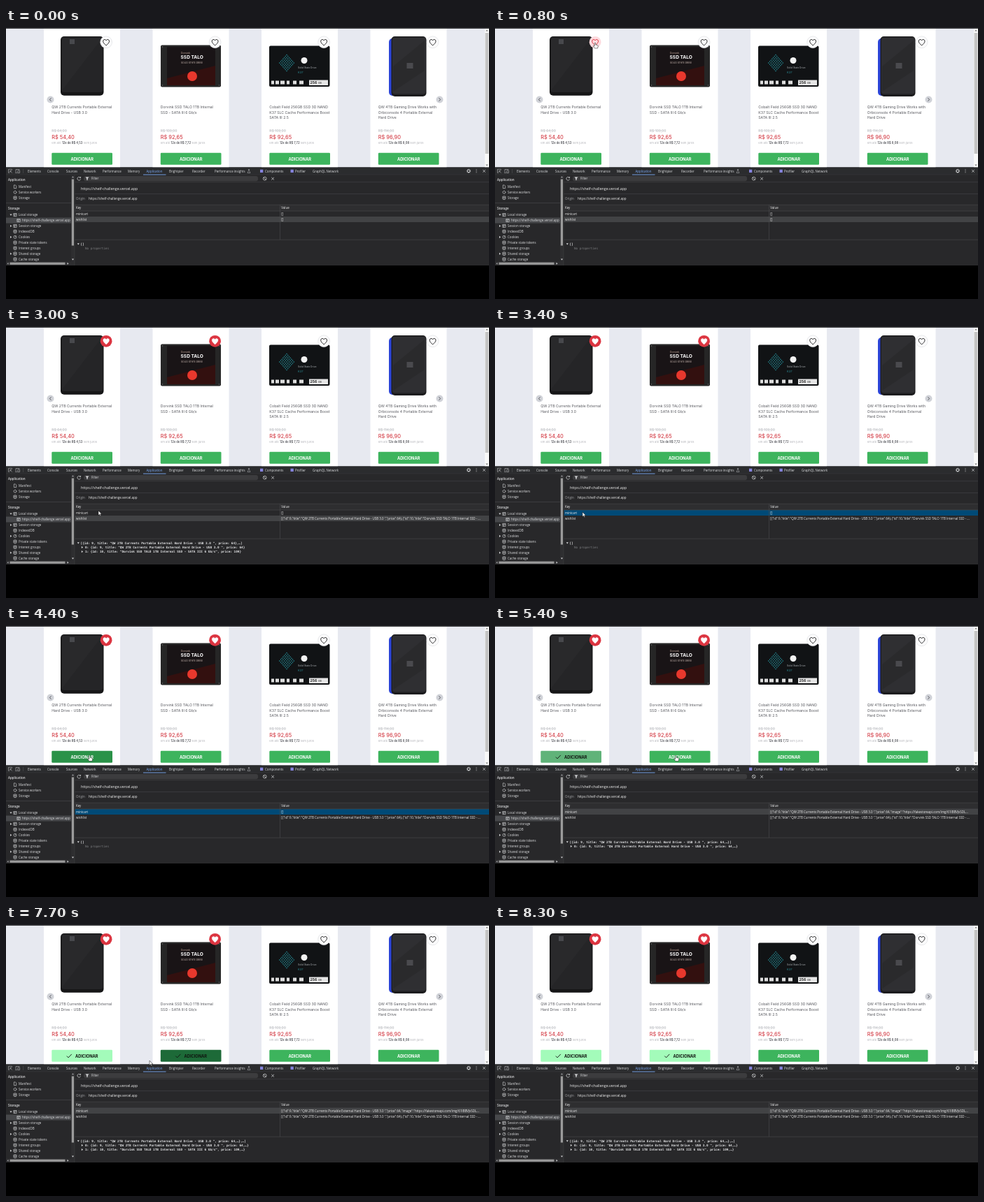
An HTML page that plays this animation: 690x388 px, repeating every 8.9 s.

```html
<!DOCTYPE html>
<html lang="en">
<head>
<meta charset="utf-8">
<title>Wishlist and cart storage</title>
<style>
html, body { margin: 0; width: 100%; height: 100%; overflow: hidden; background: #000; }
svg { display: block; width: 690px; height: 388px; }
.ui { font-family: "Open Sans", "Noto Sans", sans-serif; }
.shop { font-family: Inter, Roboto, sans-serif; }
.mono { font-family: "DejaVu Sans Mono", "Liberation Mono", monospace; }
</style>
</head>
<body>
<svg id="stage" viewBox="0 0 690 388"></svg>
<script>
const LOOP = 8900;
const STEP = 100;
const CARD_GAP = 155.5;

const rect = (x, y, w, h, fill, more = '') =>
  `<rect x="${x}" y="${y}" width="${w}" height="${h}" fill="${fill}" ${more}/>`;
const circle = (x, y, r, fill, more = '') =>
  `<circle cx="${x}" cy="${y}" r="${r}" fill="${fill}" ${more}/>`;
const line = (d, color, width = 0.7, more = '') =>
  `<path d="${d}" fill="none" stroke="${color}" stroke-width="${width}" ${more}/>`;
const shape = (d, fill, more = '') => `<path d="${d}" fill="${fill}" ${more}/>`;
const text = (x, y, str, size, fill, cls = 'ui', more = '') =>
  `<text x="${x}" y="${y}" font-size="${size}" fill="${fill}" class="${cls}" ${more}>${str}</text>`;

const DRIVE = 'QW 2TB Currents Portable External Hard Drive - USB 3.0 ';
const SSD = 'Dorvink SSD TALO 1TB Internal SSD - SATA III 6 Gb/s';

const products = [
  { title: ['QW 2TB Currents Portable External', 'Hard Drive - USB 3.0'], old: '64,00', price: '54,40', part: '4,53' },
  { title: ['Dorvink SSD TALO 1TB Internal', 'SSD - SATA III 6 Gb/s'], old: '109,00', price: '92,65', part: '7,72' },
  { title: ['Cobalt Field 256GB SSD 3D NAND', 'K37 SLC Cache Performance Boost', 'SATA III 2.5'], old: '109,00', price: '92,65', part: '7,72' },
  { title: ['QW 4TB Gaming Drive Works with', 'Orbiconsole 4 Portable External', 'Hard Drive'], old: '114,00', price: '96,90', part: '8,08' }
];

// Fine diamond of small rhombs on the third product
function lattice(cx, cy) {
  let d = '';
  for (let i = -3; i <= 3; i++) {
    for (let j = -3; j <= 3; j++) {
      d += `M${cx + (i - j) * 1.7} ${cy + (i + j) * 1.9 - 1}l1 1l-1 1l-1-1Z`;
    }
  }
  return shape(d, '#23838c');
}

// Product pictures, in stage coordinates
const pictures = [
  rect(78, 12, 61.5, 84.8, '#161617', 'rx="5"') +
    rect(79.3, 13, 59, 79, '#252527', 'rx="4"') +
    shape('M81 15H137L81 88Z', '#29292b') +
    rect(91, 16, 7, 7, '#48494d'),
  rect(221, 24.5, 86, 60, '#262626', 'rx="2"') +
    rect(230, 27, 69, 55, '#191416') +
    shape('M230 82V72L299 54V82Z', '#33100f') +
    text(250, 37, 'Dorvink', 3.6, '#c5a79a', 'shop') +
    text(249.5, 44, 'SSD TALO', 6.6, '#fff', 'shop', 'font-weight="700"') +
    text(250, 50.5, 'SOLID STATE DRIVE', 3.3, '#c9b8b0', 'shop') +
    circle(266, 69, 7, '#e8382d') +
    [[223.5, 27], [304.5, 27], [223.5, 82], [304.5, 82]].map(p => circle(...p, 0.8, '#666')).join(''),
  rect(376, 25.5, 86.5, 58.5, '#111315', 'rx="2"') +
    lattice(401, 50) +
    circle(426, 46.5, 4.5, '#f2f2f2') +
    text(417, 58, 'Solid State Drive', 3.4, '#a8acb0', 'shop') +
    text(417, 64.5, 'K37', 4, '#2b8e98', 'shop') +
    [379, 385, 392, 401, 410, 419].map((x, i) => rect(x, 75.5, 4 + i % 3, 5, '#dedede')).join('') +
    rect(433, 74.5, 27, 7.5, '#e6e6e6') +
    text(434.5, 80.2, '256', 5.2, '#151515', 'shop', 'font-weight="600"') +
    text(446, 80.2, 'GB', 3.4, '#151515', 'shop'),
  rect(547, 15, 30, 82, '#2c45d8', 'rx="5"') +
    rect(550.5, 12, 50, 86, '#1c1c1e', 'rx="5"') +
    rect(552, 13.5, 47.5, 81, '#2f2f32', 'rx="4"') +
    shape('M553 55L598 18V61L553 91Z', '#2a2a2c') +
    rect(572.5, 50, 9, 8, '#4a4a4e')
];

const HEART = 'M0 4.3C-2.2 2.5-4.4 .7-4.4-1.5A2.3 2.3 0 0 1 0-2.7A2.3 2.3 0 0 1 4.4-1.5C4.4 .7 2.2 2.5 0 4.3Z';

function card(p, i) {
  const x = 65.3 + CARD_GAP * i;
  const titles = p.title.map((s, n) => text(x, 115.4 + 7.1 * n, s, 5.15, '#55565c', 'shop')).join('');
  const part = `em até <tspan fill="#55565c" font-weight="600">12x de R$ ${p.part}</tspan> sem juros`;
  return rect(x - 11.3, 1, 109, 198.5, '#fff') + pictures[i] +
    `<circle id="dot${i}" cx="${x + 77.8}" cy="20.3" r="8.4" stroke-width=".6"/>` +
    `<path id="heart${i}" d="${HEART}" transform="translate(${x + 77.8} 20.6)" stroke-linejoin="round"/>` +
    titles +
    text(x, 148.6, `R$ ${p.old}`, 5, '#bcbdc2', 'shop', 'text-decoration="line-through"') +
    text(x, 158.6, `R$ ${p.price}`, 7.4, '#d5434c', 'shop', 'font-weight="500"') +
    text(x, 165.8, part, 4.2, '#b4b5ba', 'shop') +
    `<rect id="btn${i}" x="${x}" y="178.7" width="86.7" height="17" rx="1.2"/>` +
    `<path id="tick${i}" d="M${x + 21.5} 187.6l2.3 2.3 4.7-5" fill="none" stroke="#111" stroke-width=".9"/>` +
    `<text id="label${i}" y="189.5" font-size="5.7" font-weight="700" text-anchor="middle" class="shop">ADICIONAR</text>`;
}

function carousel() {
  const arrow = (x, dir) => circle(x, 102.5, 5, '#d0d2d8') +
    line(`M${x - dir} 100.3l${2.1 * dir} 2.2l${-2.1 * dir} 2.2`, '#44464c', 0.9);
  return rect(0, 0, 690, 199.5, '#e7e9f0') + products.map(card).join('') +
    arrow(63.5, -1) + arrow(619.5, 1) +
    rect(684, 0, 6, 199.5, '#f8f8f8') + rect(684.6, 7, 4.8, 173, '#c3c3c3') +
    shape('M685.3 4.6l1.7-2 1.7 2Z', '#777') + shape('M685.3 195.6l1.7 2 1.7-2Z', '#777') +
    rect(0, 0, 690, 1, '#3a3b3d');
}

const INK = '#dcdddf', BRIGHT = '#f1f1f1', DIM = '#a6a7aa', BLUE = '#7cacf8';
const PANEL = '#28282a', EDGE = '#4a4b4e', THUMB = '#9b9b9b';

function toolbar() {
  const tabs = [['Elements', 31], ['Console', 59], ['Sources', 86], ['Network', 111], ['Performance', 138],
    ['Memory', 174], ['Application', 200.5, BLUE], ['Brightpier', 233], ['Recorder', 266],
    ['Performance insights', 298], ['Components', 370], ['Profiler', 413], ['GraphQL Network', 438]];
  return rect(0, 199.5, 690, 11, '#2b2c2e') + line('M0 210.3H690', EDGE, 0.6) +
    tabs.map(([s, x, c]) => text(x, 206.7, s, 4.4, c || INK)).join('') +
    rect(196, 209.6, 32.5, 1.2, BLUE) +
    line('M8.5 203.5V202.3H3.5V207.3H5M5.8 204.6l3 3M5.8 206.7V204.5H8', DIM) +
    line('M14 206.5V202.5H19.5M13 207.3H16.5M17 204H19.6V207.5H17Z', DIM) +
    line('M24.5 202V208', EDGE) +
    line('M346 202.5H348M346.4 202.5V204.5L345 207.5H349L347.6 204.5V202.5', DIM, 0.6) +
    rect(363, 202.7, 4.3, 4.3, '#8583dd') + rect(406.5, 202.7, 4.3, 4.3, '#8583dd') +
    circle(661, 204.8, 1.9, 'none', `stroke="${INK}" stroke-width="1"`) +
    circle(661, 204.8, 2.7, 'none', `stroke="${INK}" stroke-width=".7" stroke-dasharray="1 1.1"`) +
    [202.8, 204.8, 206.8].map(y => circle(672, y, 0.5, INK)).join('') +
    line('M681.2 203l3.6 3.6M684.8 203l-3.6 3.6', INK);
}

const triangle = (x, y, open) =>
  shape(open ? `M${x - 1.5} ${y - 1}h3l-1.5 2.2Z` : `M${x - 0.9} ${y - 1.6}v3.2l2.1-1.6Z`, INK);
const icons = {
  page: (x, y) => line(`M${x - 1.6} ${y - 2.3}h2l1.3 1.3v3.4h-3.3Z`, INK, 0.6),
  gear: (x, y) => circle(x, y, 1.9, 'none', `stroke="${INK}" stroke-width="1" stroke-dasharray="1.3 .6"`),
  data: (x, y) => line(`M${x - 2} ${y - 1.6}a2 .8 0 0 1 4 0a2 .8 0 0 1-4 0v3.2a2 .8 0 0 0 4 0v-3.2M${x - 2} ${y}a2 .8 0 0 0 4 0`, INK, 0.6),
  grid: (x, y) => line(`M${x - 2.2} ${y - 2}h4.4v4h-4.4ZM${x - 2.2} ${y - 0.6}h4.4M${x - 0.5} ${y - 0.6}v2.6`, INK, 0.6),
  disc: (x, y) => circle(x, y, 2.1, 'none', `stroke="${INK}" stroke-width=".6"`) + circle(x + 0.4, y - 0.5, 0.6, INK)
};

function sidebar() {
  const item = ([s, icon, fold], y, x = 18) =>
    (fold ? triangle(7, y, fold === 'open') : '') + icons[icon](x - 5, y) + text(x, y + 1.6, s, 4.45, INK);
  const app = [['Manifest', 'page'], ['Service workers', 'gear'], ['Storage', 'data']];
  const store = [['Session storage', 'grid', 'shut'], ['IndexedDB', 'data'], ['Cookies', 'disc', 'shut'],
    ['Private state tokens', 'data'], ['Interest groups', 'data'], ['Shared storage', 'data', 'shut'], ['Cache storage', 'data']];
  return rect(0, 210.6, 98, 129.4, PANEL) +
    text(3, 219.3, 'Application', 4.5, INK, 'ui', 'font-weight="600"') +
    app.map((a, i) => item(a, 227.2 + 8 * i)).join('') +
    line('M0 250.5H93', EDGE, 0.6) +
    text(3, 260, 'Storage', 4.5, INK, 'ui', 'font-weight="600"') +
    item(['Local storage', 'grid', 'open'], 267.5) +
    rect(0, 271.5, 93, 8, '#47484b') +
    item(['https://shelf-challenge.vercel.app', 'grid'], 275.5, 23) +
    store.map((a, i) => item(a, 283.4 + 7.95 * i)).join('') +
    rect(93, 210.6, 5, 124, '#2e2e30') + rect(93.8, 216.5, 3.2, 95, THUMB) +
    shape('M94 214.2l1.5-2 1.5 2Z', DIM) + shape('M94 330.5l1.5 2 1.5-2Z', INK) +
    rect(0, 334.5, 98, 5.5, '#2e2e30') + rect(5.5, 335.6, 79, 3.2, THUMB) +
    shape('M3.5 335.7v3l-2-1.5Z', DIM) + shape('M87.5 335.7v3l2-1.5Z', INK) +
    line('M98.2 210.6V340', EDGE, 0.7);
}

function storagePanel() {
  return rect(98.5, 210.6, 591.5, 129.4, PANEL) +
    rect(111, 212, 249, 7.2, '#3c3c3e', 'rx="3"') +
    line('M106.2 214.2a2.4 2.4 0 1 0 .4 2.2M106.6 212.8v1.8h-1.8', INK, 0.7) +
    shape('M113.6 213.5h4.8l-1.8 2.3v2.2h-1.2v-2.2Z', INK) +
    text(122, 217.4, 'Filter', 4.45, INK) +
    circle(369.7, 215.6, 2.4, 'none', `stroke="${INK}" stroke-width=".7"`) + line('M368 214l3.4 3.4', INK) +
    line('M379.2 213.8l3.8 3.8M383 213.8l-3.8 3.8', INK) +
    line('M98.5 220.6H690M98.5 237.5H690', EDGE, 0.5) +
    text(107, 232.2, 'https://shelf-challenge.vercel.app', 5.25, BRIGHT) +
    text(100, 246, 'Origin', 4.45, DIM) +
    text(118, 246, 'https://shelf-challenge.vercel.app', 4.5, BRIGHT) +
    rect(98.5, 253.3, 591.5, 8.6, '#2e2e30') +
    text(100, 259.3, 'Key', 4.45, BRIGHT) + text(393.3, 259.3, 'Value', 4.45, BRIGHT) +
    ['minicart', 'wishlist'].map((key, i) => {
      const y = 262 + 8 * i;
      return `<rect id="row${i}" x="98.5" y="${y}" width="591.5" height="8"/>` +
        text(100, y + 5.6, key, 4.45, BRIGHT) +
        `<text id="value${i}" x="393.3" y="${y + 5.6}" font-size="4.48" fill="${BRIGHT}" class="ui"></text>`;
    }).join('') +
    line('M391.5 253.3V303', EDGE, 0.6) +
    line('M98.5 253.2H690M98.5 262H690M98.5 303.2H690', EDGE, 0.6) +
    triangle(103.3, 309.2, true) +
    `<g id="fold0">${triangle(108.8, 315.4)}</g><g id="fold1">${triangle(108.8, 321.6)}</g>` +
    [[106.6, 310.8], [113, 317], [113, 323.2]].map(([x, y], i) =>
      `<text id="json${i}" x="${x}" y="${y}" font-size="4.36" class="mono"></text>`).join('');
}

const pointer =
  `<g id="cursor" stroke="#111" stroke-width=".5" stroke-linejoin="round" fill="#fff">` +
  `<path id="arrow" d="M0 0V6.6L1.6 5.2L2.7 7.6L3.7 7.1L2.6 4.8H4.7Z"/>` +
  `<path id="hand" d="M-.8 .6Q0-.5 .8 .6V3L3.6 3.6Q4.4 3.9 4.2 5L3.6 8H-.6L-2.7 5.1Q-2.6 4.1-1.6 4.5L-.8 5.2Z"/></g>`;

const stage = document.getElementById('stage');
stage.innerHTML = rect(0, 0, 690, 388, '#000') + carousel() + toolbar() + storagePanel() + sidebar() + pointer;

const parts = {};
stage.querySelectorAll('[id]').forEach(el => { parts[el.id] = el; });
const set = (id, attrs) => { for (const k in attrs) parts[id].setAttribute(k, attrs[k]); };
const show = (id, on) => set(id, { visibility: on ? 'visible' : 'hidden' });
const write = (id, str) => { if (parts[id].textContent !== str) parts[id].textContent = str; };

// Keys are [time, ...numbers]; values between them are blended.
function track(keys, t, ease = k => k) {
  const i = keys.findIndex(k => k[0] > t);
  if (i === 0) return keys[0].slice(1);
  if (i < 0) return keys[keys.length - 1].slice(1);
  const a = keys[i - 1], b = keys[i];
  const k = ease((t - a[0]) / (b[0] - a[0]));
  return a.slice(1).map((v, n) => v + (b[n + 1] - v) * k);
}
const smooth = k => k * k * (3 - 2 * k);
const rgb = c => `rgb(${c.map(Math.round).join()})`;

const path = [
  [0, -20, 246], [100, 3, 230], [400, 141, 22], [500, 141, 22], [800, 143, 21], [1100, 143, 21],
  [1600, 294, 23], [1800, 297, 21], [2400, 297, 21], [3000, 132, 263], [3300, 125, 265], [3600, 125, 265],
  [4400, 119.5, 185.5], [5100, 119.5, 185.5], [5400, 258.5, 185.5], [6000, 269, 185.5], [6800, 269, 185.5],
  [7000, 281, 185.5], [7500, 281, 185.5], [8100, -12, 219]
];

const GREEN = [61, 180, 93], HOVER = [42, 146, 72], DARK = [29, 106, 56], LIGHT = [163, 251, 186];
const WHITE = [252, 252, 253], PINK = [253, 219, 223], RED = [220, 53, 65];
const added = [4600, 5700], liked = [1000, 1900];
const buttonKeys = [
  [[4100, ...GREEN], [4300, ...HOVER], [4500, ...HOVER], [4800, ...DARK], [5200, ...DARK], [5600, ...LIGHT]],
  [[5400, ...GREEN], [5600, ...HOVER], [6000, ...DARK], [7700, ...DARK], [8100, ...LIGHT]]
];
const dotKeys = [
  [[500, ...WHITE], [800, ...PINK], [900, ...PINK], [1100, ...RED]],
  [[1400, ...WHITE], [1600, ...PINK], [1800, ...PINK], [2100, ...RED]]
];

const entry = (id, title, price, more = '') => `{id: ${id}, title: "${title}", price: ${price}${more}}`;
const stored = (id, title, price) => `{"id":${id},"title":"${title}","price":${price}`;
const first = stored(9, DRIVE, 64);

function preview(t) {
  if (t < 1000 || (t >= 3400 && t < 4600)) return ['[]', 'No properties'];
  const more = t >= 4600 ? ',…' : '';
  const two = t >= 5700 || (t >= 1900 && t < 3400);
  const drive = entry(9, DRIVE, 64, more);
  const lines = [`[${drive}${two ? ',…' : ''}]`, `0: ${drive}`];
  if (two) lines.push(`1: ${entry(10, SSD, 109, more)}`);
  return lines;
}

function drawShop(t, x, y) {
  let over = false;
  products.forEach((p, i) => {
    const left = 65.3 + CARD_GAP * i;
    const done = t >= added[i], loved = t >= liked[i];
    const dot = dotKeys[i] ? track(dotKeys[i], t) : WHITE;
    const tinted = dot[1] < 240;
    set('btn' + i, { fill: rgb(buttonKeys[i] ? track(buttonKeys[i], t) : GREEN) });
    set('label' + i, { x: left + (done ? 50 : 43.4), fill: done ? '#101510' : '#fff' });
    show('tick' + i, done);
    set('dot' + i, { fill: rgb(dot), stroke: tinted ? 'none' : '#d9dade' });
    set('heart' + i, {
      fill: loved ? '#fff' : 'none',
      stroke: loved ? '#fff' : tinted ? '#dc3541' : '#222',
      'stroke-width': loved ? 0.3 : 0.95
    });
    over = over || Math.hypot(x - left - 77.8, y - 20.3) < 9 ||
      (x > left && x < left + 86.7 && y > 178 && y < 196);
  });
  return over;
}

function drawStorage(t) {
  const cart = t >= 3400;
  set('row0', { fill: cart ? (t < 4600 ? '#004a77' : '#424345') : PANEL });
  set('row1', { fill: cart ? PANEL : '#424345' });
  write('value0', t < 4600 ? '[]' : `[${first},"image":"https://fakestoreapi.com/img/61IBBVJvSDL…`);
  write('value1', t < 1000 ? '[]' : t < 1900 ? `[${first}}]` :
    `[${first}},{"id":10,"title":"Dorvink SSD TALO 1TB Internal SSD - …`);
  const lines = preview(t);
  const empty = lines[0] === '[]';
  for (let i = 0; i < 3; i++) {
    const hint = empty && i > 0;
    write('json' + i, lines[i] || '');
    set('json' + i, { fill: hint ? '#7d7e81' : '#e4e5e7', 'font-weight': hint ? 400 : 700 });
  }
  show('fold0', !empty);
  show('fold1', lines.length > 2);
}

function draw(t) {
  const [x, y] = track(path, t, smooth);
  const over = drawShop(t, x, y);
  drawStorage(t);
  set('cursor', { transform: `translate(${x} ${y})` });
  show('hand', over);
  show('arrow', !over);
}

const start = performance.now();
function tick() {
  const t = (performance.now() - start) % LOOP;
  draw(Math.floor(t / STEP) * STEP);
  requestAnimationFrame(tick);
}
tick();
</script>
</body>
</html>
```
